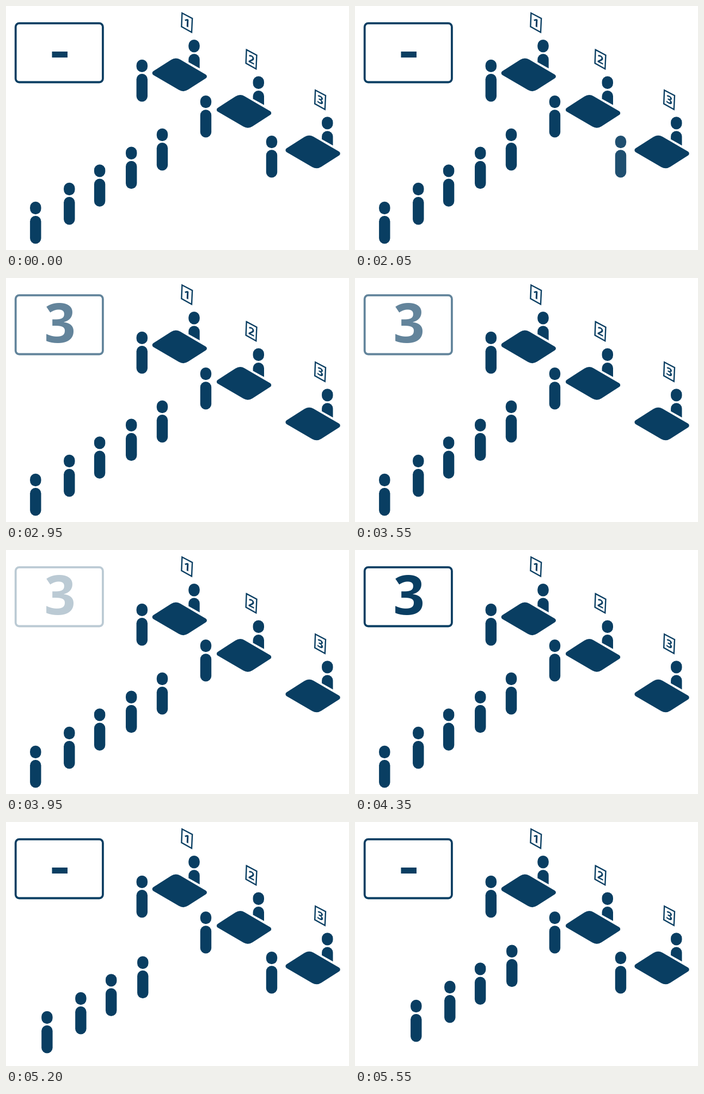
Recreate the animation shown at these times as an HTML page with a canvas. Size 630x450 px, loop 5600 ms.

```html
<!DOCTYPE html>
<html lang="en">
<head>
<meta charset="utf-8">
<title>Queue display</title>
<style>
  html, body { margin: 0; width: 100%; height: 100%; overflow: hidden; background: #fff; }
  canvas { display: block; width: 630px; height: 450px; }
</style>
</head>
<body>
<canvas id="stage" width="630" height="450"></canvas>
<script>
const ctx = document.getElementById('stage').getContext('2d');
const INK = '#093e62';
const FONT = '"Open Sans", "Noto Sans", sans-serif';
const LOOP = 5600, TICK = 50, STEPS = 11;

const queue = [[54.3, 360.8], [116.3, 325.8], [172.1, 292.2], [230.2, 259.5]];
const front = [287, 225.8];
const served = [[249.8, 98.7], [367, 164.9]];
const lastSeat = [488, 238.9];
const desks = [[0, 0], [118.3, 67.6], [244.8, 142.2]];
const advance = [58, -33];

function pill(x, y, w, h, r) {
  ctx.beginPath();
  ctx.roundRect(x, y, w, h, r);
  ctx.fill();
}

function person([x, y], alpha = 1) {
  ctx.globalAlpha = alpha;
  pill(x - 10.2, y, 20.4, 23.4, 10.2);
  pill(x - 10.2, y + 26.3, 20.4, 51.4, 10.2);
  ctx.globalAlpha = 1;
}

function clerk() {
  pill(335.3, 62, 20.4, 23.4, 10.2);
  ctx.beginPath();
  ctx.moveTo(335.3, 103.6);
  ctx.lineTo(335.3, 98.5);
  ctx.arc(345.5, 98.5, 10.2, Math.PI, 0);
  ctx.lineTo(355.7, 115);
  ctx.fill();
}

function table() {
  ctx.beginPath();
  ctx.moveTo(288, 109);
  ctx.arcTo(311.5, 93.9, 372.6, 129.7, 16);
  ctx.arcTo(372.6, 129.7, 326.1, 159.7, 4);
  ctx.arcTo(326.1, 159.7, 265, 123.9, 16);
  ctx.arcTo(265, 123.9, 311.5, 93.9, 4);
  ctx.closePath();
  ctx.fill();
}

function sign(label) {
  ctx.lineWidth = 2.4;
  ctx.beginPath();
  ctx.moveTo(323.4, 13);
  ctx.lineTo(342.2, 23);
  ctx.lineTo(341, 48.5);
  ctx.lineTo(322.4, 38);
  ctx.closePath();
  ctx.stroke();
  ctx.save();
  ctx.transform(1, 0.5, -0.04, 1, 332.2, 38);
  ctx.font = 'bold 20px ' + FONT;
  ctx.fillText(label, 0, 0);
  ctx.restore();
}

function display(called, alpha) {
  ctx.globalAlpha = alpha;
  ctx.lineWidth = 3.8;
  ctx.beginPath();
  ctx.roundRect(17.7, 31.9, 160.2, 108.6, 6.5);
  ctx.stroke();
  if (called) {
    ctx.font = 'bold 101px ' + FONT;
    ctx.fillText('3', 99, 118.6);
  } else {
    ctx.fillRect(84.5, 84, 28.5, 11);
  }
  ctx.globalAlpha = 1;
}

// Linear progress of a phase, 0 to 1 over eleven ticks
const phase = (t, start) => Math.min(1, Math.max(0, (t - start) / (STEPS * TICK)));
const shift = ([x, y], [dx, dy], p) => [x + dx * p, y + dy * p];

function draw(time) {
  const t = Math.floor((time % LOOP) / TICK) * TICK;
  ctx.fillStyle = '#fff';
  ctx.fillRect(0, 0, 630, 450);
  ctx.fillStyle = ctx.strokeStyle = INK;
  ctx.textAlign = 'center';

  const called = t >= 2600 && t < 5000;
  const blinking = t >= 2600 && t < 4400;
  display(called, blinking ? phase((t - 2600) % 600, 0) : 1);

  desks.forEach(([x, y], i) => {
    ctx.save();
    ctx.translate(x, y);
    clerk();
    table();
    sign(String(i + 1));
    ctx.restore();
  });

  served.forEach(p => person(p));
  person(lastSeat, 1 - phase(t, 2000));
  const way = [lastSeat[0] - front[0], lastSeat[1] - front[1]];
  person(shift(front, way, phase(t, 4400)));
  queue.forEach(p => person(shift(p, advance, phase(t, 5000))));
}

const begin = performance.now();
function frame() {
  draw(performance.now() - begin);
  requestAnimationFrame(frame);
}
frame();
</script>
</body>
</html>
```
